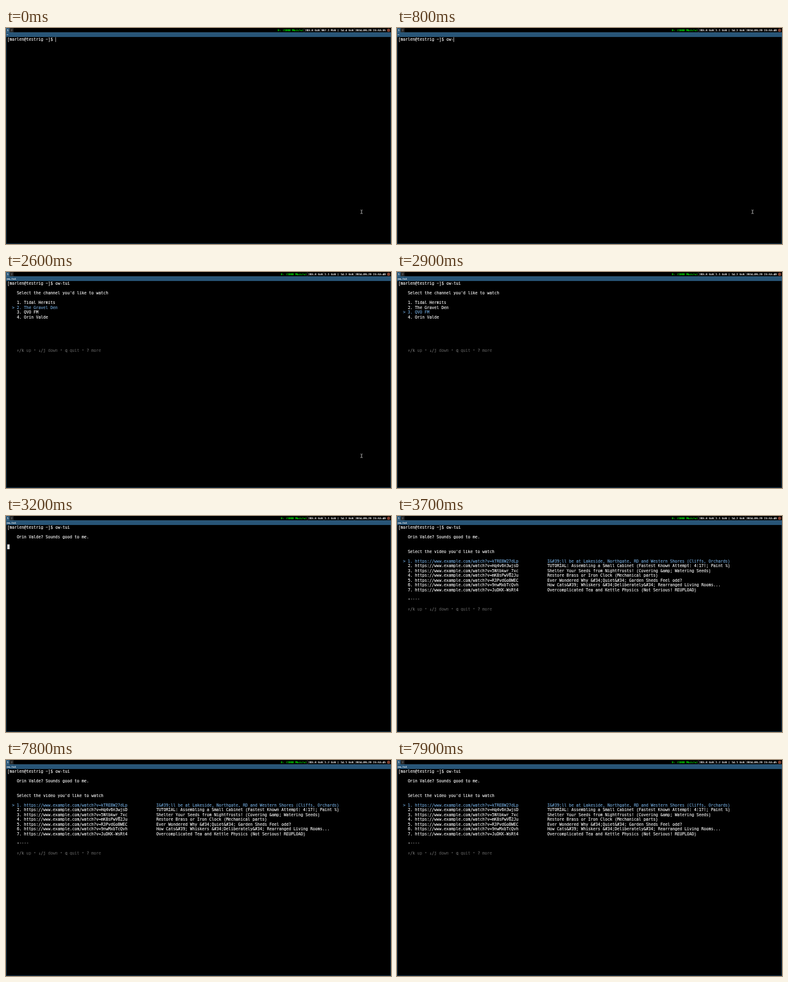
These frames come from a looping animation (600 px wide and 338 px high, 8000 ms). An HTML page:

```html
<!DOCTYPE html>
<html lang="en">
<head>
<meta charset="utf-8">
<title>Terminal session</title>
<style>
  html, body { margin: 0; width: 100%; height: 100%; overflow: hidden; background: #000; }
  #screen {
    position: absolute; left: 0; top: 0; width: 1920px; height: 1080px;
    overflow: hidden; background: #000; color: #fff;
    transform: scale(.3125, .31296); transform-origin: 0 0;
    font-family: "DejaVu Sans Mono", monospace; white-space: pre;
  }
  #screen * { position: absolute; box-sizing: border-box; }
  .small { font-size: 13.29px; line-height: 22px; -webkit-text-stroke: .5px; }
  .space { top: 0; width: 18px; height: 22px; border: 1px solid; text-align: center; line-height: 20px; }
  .space.on { left: 0; background: #285577; border-color: #4c7899; }
  .space.off { left: 19px; background: #222; border-color: #333; color: #888; }
  #screen .status { right: 26px; top: 0; display: flex; }
  #screen .status span { position: static; }
  #screen .status span + span { margin-left: 4px; padding-left: 4px; border-left: 1px solid #666; }
  #screen .status .net { color: #0f0; }
  .tray { left: 1900px; top: 3px; width: 16px; height: 16px; border-radius: 50%; background: #84402f; }
  .window { left: 0; top: 22px; width: 1920px; bottom: 0; border: 2px solid #285577; }
  .title { left: 0; top: 22px; width: 1920px; height: 23px; background: #285577; border-top: 1px solid #4c7899; }
  .title-text { left: 3px; top: 22px; line-height: 23px; }
  #term { left: 6px; top: 46px; font-size: 19.93px; line-height: 24px; -webkit-text-stroke: .3px; }
  .block { width: 12px; height: 24px; background: #ddd; }
  .beam { width: 2px; height: 24px; background: #fff; }
  .pointer { left: 1764px; top: 908px; width: 18px; height: 22px; }
</style>
</head>
<body>
<div id="screen">
  <div class="small space on">1</div>
  <div class="small space off">2</div>
  <div class="tray"></div>
  <div class="window"></div>
  <div class="title"></div>
  <div id="term"></div>
  <svg class="pointer" viewBox="0 0 18 22">
    <path d="M4 2h3l2 2 2-2h3M9 4v14M4 20h3l2-2 2 2h3" fill="none" stroke="#eee" stroke-width="2.4"/>
  </svg>
</div>
<script>
const LOOP = 8000, CELL = 12, ROW = 24;
const BLUE = '#72aadc', KEY = '#707070', DIM = '#565656', FAINT = '#484848';
const screen = document.getElementById('screen');
const term = document.getElementById('term');
const timed = [];

function during(el, from, to) {
  timed.push({ el, from, to });
  return el;
}

function add(parent, cls, text = '') {
  const el = document.createElement('div');
  el.className = cls;
  el.textContent = text;
  parent.append(el);
  return el;
}

function put(row, col, text, from, to, color = '#fff', cls = '') {
  const el = add(term, cls, text);
  el.style.left = col * CELL + 'px';
  el.style.top = row * ROW + 'px';
  el.style.color = color;
  return during(el, from, to);
}

function item(row, text, from, to, selFrom, selTo) {
  put(row, 4, text, from, selFrom);
  put(row, 2, '> ' + text, selFrom, selTo, BLUE);
  put(row, 4, text, selTo, to);
}

function help(row, from, to) {
  const parts = [['↑/k', KEY], [' up', DIM], [' • ', FAINT], ['↓/j', KEY], [' down', DIM],
    [' • ', FAINT], ['q', KEY], [' quit', DIM], [' • ', FAINT], ['?', KEY], [' more', DIM]];
  let col = 4;
  for (const [text, color] of parts) {
    put(row, col, text, from, to, color);
    col += text.length;
  }
}

function status(memory, clock, from, to) {
  const bar = during(add(screen, 'small status'), from, to);
  for (const text of ['E: (1000 Mbit/s)', '203.8 GiB', memory, '2024-09-29 ' + clock]) {
    const span = document.createElement('span');
    span.textContent = text;
    bar.append(span);
  }
  bar.firstChild.className = 'net';
}

// Status bar and window title
status('987.1 MiB | 14.4 GiB', '23:53:35', 0, 300);
status('1.1 GiB | 14.2 GiB', '23:53:40', 300, 5300);
status('1.2 GiB | 14.1 GiB', '23:53:45', 5300, LOOP);

const command = 'ow-tui', enter = 1800;
during(add(screen, 'small title-text', '~'), 0, enter);
during(add(screen, 'small title-text', command), enter, LOOP);

// Prompt and typing
put(0, 0, '[marlen@testrig ~]$', 0, LOOP);
put(0, 20, '', 0, 300, '', 'beam');
const keys = [600, 700, 800, 1400, 1500, 1700, enter];
[...command].forEach((ch, i) => {
  put(0, 20 + i, ch, keys[i], LOOP);
  put(0, 21 + i, '', keys[i], keys[i + 1], '', 'beam');
});
put(1, 0, '', enter, 2100, '', 'block');

// Channel list
const picks = [2100, 2600, 2800, 3000, 3200];
put(2, 4, "Select the channel you'd like to watch", 2100, 3200);
['Tidal Hermits', 'The Gravel Den', 'QVO FM', 'Orin Valde'].forEach((name, i) =>
  item(4 + i, `${i + 1}. ${name}`, 2100, 3200, picks[i], picks[i + 1]));
help(14, 2100, 3200);
during(document.querySelector('.pointer'), 0, 2700);

// Confirmation
put(2, 4, 'Orin Valde? Sounds good to me.', 3200, LOOP);
put(4, 0, '', 3200, 3700, '', 'block');

// Video list
const videos = [
  ['kTREBW27dLp', 'I&#39;ll be at Lakeside, Northgate, RD and Western Shores (Cliffs, Orchards)'],
  ['Hq4v6n3wjsD', 'TUTORIAL: Assembling a Small Cabinet (Fastest Known Attempt: 4:17!; Paint %)'],
  ['5Ntbkwr_7xc', 'Shelter Your Seeds from Nightfrosts! (Covering &amp; Watering Seeds)'],
  ['mK8sPwV62Ju', 'Restore Brass or Iron Clock (Mechanical parts)'],
  ['R3PvdGoBWEC', 'Ever Wondered Why &#34;Quiet&#34; Garden Sheds Feel odd?'],
  ['9nwMxbTcQvh', 'How Cats&#39; Whiskers &#34;Deliberately&#34; Rearranged Living Rooms...'],
  ['JuDKK-WsRt4', 'Overcomplicated Tea and Kettle Physics (Not Serious! REUPLOAD)'],
];
put(5, 4, "Select the video you'd like to watch", 3700, LOOP);
videos.forEach(([id, title], i) => {
  const line = `${i + 1}. https://www.example.com/watch?v=${id}`.padEnd(58) + title;
  item(7 + i, line, 3700, LOOP, 3700, i ? 3700 : LOOP);
});
put(15, 4, '•', 3700, LOOP, '#979797');
put(15, 5, '••••', 3700, LOOP, FAINT);
help(17, 3700, LOOP);

const start = performance.now();
function render() {
  const t = (performance.now() - start) % LOOP;
  for (const { el, from, to } of timed) {
    el.style.visibility = t >= from && t < to ? 'visible' : 'hidden';
  }
  requestAnimationFrame(render);
}
render();
</script>
</body>
</html>
```
